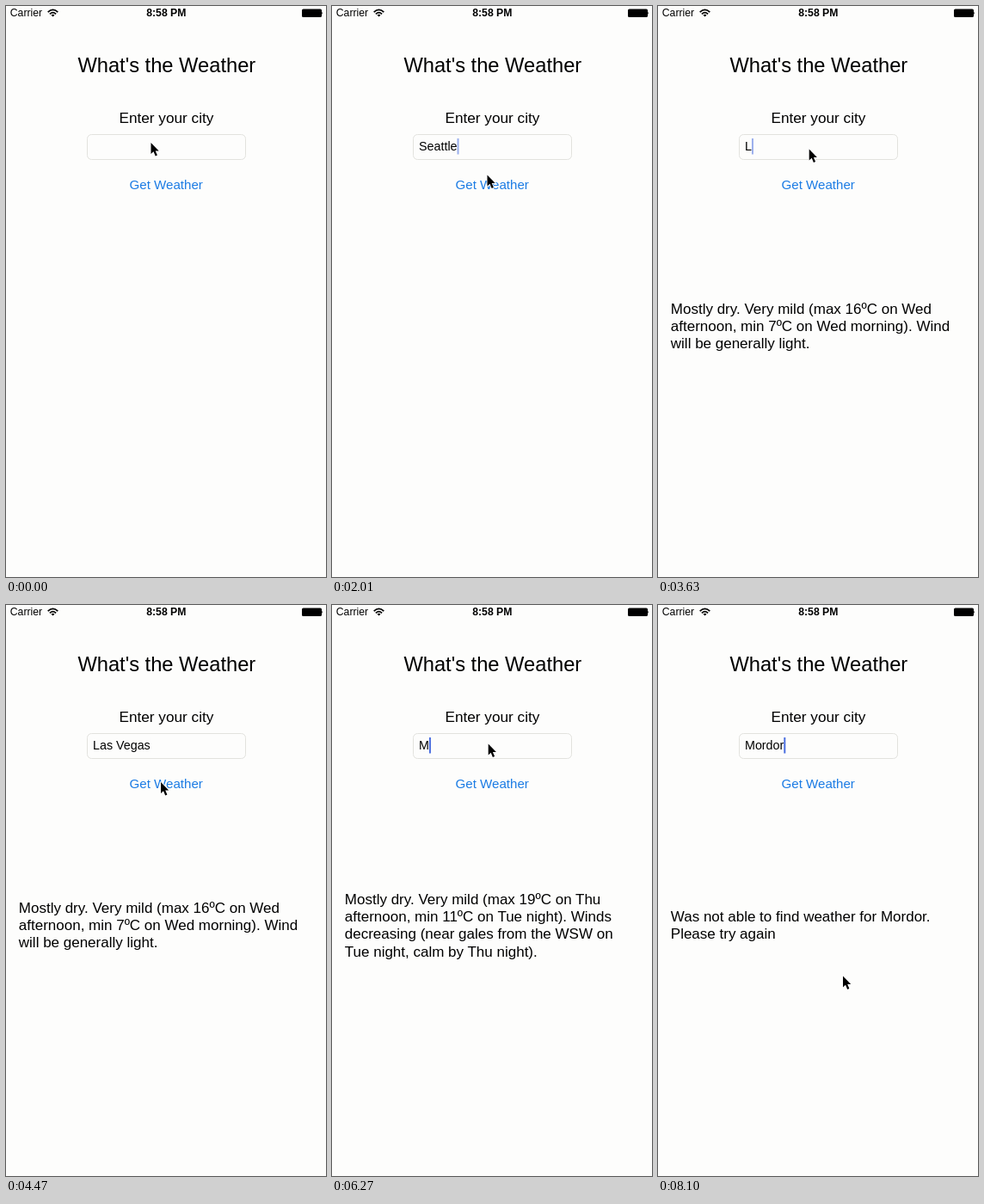
Write an HTML page that moves like this. It is 372 by 664 pixels and loops after 8.13 s.

```html
<!DOCTYPE html>
<html lang="en">
<head>
<meta charset="utf-8">
<title>What's the Weather</title>
<style>
  html, body { margin: 0; width: 100%; height: 100%; overflow: hidden; background: #fdfdfc; }
  svg { display: block; width: 372px; height: 664px; }
  text { font-family: "Liberation Sans", Arial, sans-serif; fill: #000; white-space: pre; }
  .mid { text-anchor: middle; }
</style>
</head>
<body>
<svg viewBox="0 0 372 664">
  <rect width="372" height="664" fill="#fdfdfc"/>

  <text x="4.8" y="12.4" font-size="12.2">Carrier</text>
  <g fill="none" stroke="#000" stroke-width="1.7">
    <path d="M48.7 7.2Q54.5 1.7 60.3 7.2"/>
    <path d="M50.9 9.3Q54.5 5.8 58.1 9.3"/>
  </g>
  <path d="M54.5 12.6l-2-2.1q2-1.7 4 0z"/>
  <text class="mid" x="186.3" y="12.4" font-size="12.2" font-weight="bold">8:58 PM</text>
  <rect x="344" y="3.5" width="23" height="9.5" rx="1.6"/>
  <path d="M367.4 6.6q1.7 1.6 0 3.3z"/>

  <text class="mid" x="186.8" y="77" font-size="23.7">What's the Weather</text>
  <text class="mid" x="186.4" y="136.4" font-size="17.2">Enter your city</text>
  <rect x="94.5" y="149.5" width="184" height="29" rx="5" fill="#fdfdfc" stroke="#e2e2de"/>
  <text id="city" x="101" y="168.4" font-size="14.3"></text>
  <rect id="caret" y="154" width="2" height="18.5" fill="#4a6ee0"/>
  <text class="mid" x="186.2" y="213.4" font-size="15.1" style="fill:#1a7be4">Get Weather</text>
  <g id="report" font-size="17"></g>

  <path id="cursor" d="M0 0V13L3 10.2L5.2 15.4L7.4 14.5L5.2 9.4H9.2Z" stroke="#fff" stroke-width="1.6" paint-order="stroke" stroke-linejoin="round"/>
</svg>
<script>
const LOOP = 8130, STEP = 30, MOVE = 270, ERASE = 360, BLINK = 1050;
const $ = id => document.getElementById(id);
const city = $("city"), caret = $("caret"), report = $("report"), cursor = $("cursor");

// focus: field tapped, type..done: typing, reply: answer shown
const rounds = [
  { word: "Seattle", focus: 630, type: 870, done: 1260, reply: 2100, found: true, lines: [
    "Mostly dry. Very mild (max 16ºC on Wed",
    "afternoon, min 7ºC on Wed morning). Wind",
    "will be generally light."] },
  { word: "Las Vegas", focus: 2910, type: 3450, done: 4200, reply: 4770, found: true, lines: [
    "Mostly dry. Very mild (max 19ºC on Thu",
    "afternoon, min 11ºC on Tue night). Winds",
    "decreasing (near gales from the WSW on",
    "Tue night, calm by Thu night)."] },
  { word: "Mordor", focus: 5070, type: 6150, done: 6600, reply: 7530, found: false, lines: [
    "Was not able to find weather for Mordor.",
    "Please try again"] }
];

// start time and destination of each pointer move
const moves = [
  [1080, 180.5, 196.5], [2280, 175.7, 166.5], [4140, 180, 206], [4800, 181.7, 161.5],
  [6690, 178, 207], [7020, 175.7, 230], [7800, 215, 431.5]
];

const clamp = v => Math.min(1, Math.max(0, v));
const span = (t, from, to) => clamp((t - from) / (to - from));
const ease = p => p * p * (3 - 2 * p);

function typed(t) {
  const i = rounds.findLastIndex(r => r.focus <= t);
  if (i < 0) return "";
  const { word, type, done } = rounds[i];
  if (t >= type) return word.slice(0, 1 + Math.floor((word.length - 1) * span(t, type, done) ** 2));
  const old = i ? rounds[i - 1].word : "";
  const begin = type - ERASE - 120;
  return old.slice(0, Math.ceil(old.length * (1 - span(t, begin, begin + ERASE))));
}

function caretOpacity(t) {
  const r = rounds.findLast(r => r.focus <= t);
  if (!r || (r.found && t >= r.reply)) return 0;
  return clamp(0.9 + 0.9 * Math.cos((t - r.focus) / BLINK * 2 * Math.PI));
}

function pointer(t) {
  let x = 168.5, y = 159;
  for (const [start, toX, toY] of moves) {
    const p = ease(span(t, start, start + MOVE));
    x += (toX - x) * p;
    y += (toY - y) * p;
  }
  return `translate(${x} ${y})`;
}

let shown;
function showReport(t) {
  const r = rounds.findLast(r => r.reply <= t);
  if (r === shown) return;
  shown = r;
  const lines = r ? r.lines : [];
  report.replaceChildren(...lines.map((line, i) => {
    const row = document.createElementNS("http://www.w3.org/2000/svg", "text");
    row.setAttribute("x", 14.8);
    row.setAttribute("y", 378.2 + (i - (lines.length - 1) / 2) * 20.2);
    row.textContent = line;
    return row;
  }));
}

function draw(t) {
  const word = typed(t);
  if (city.textContent !== word) city.textContent = word;
  caret.setAttribute("x", 101 + (word ? city.getComputedTextLength() : 0));
  caret.setAttribute("opacity", caretOpacity(t));
  cursor.setAttribute("transform", pointer(t));
  showReport(t);
}

const start = performance.now();
function tick() {
  const t = (performance.now() - start) % LOOP;
  draw(Math.floor(t / STEP) * STEP);
  requestAnimationFrame(tick);
}
tick();
</script>
</body>
</html>
```
